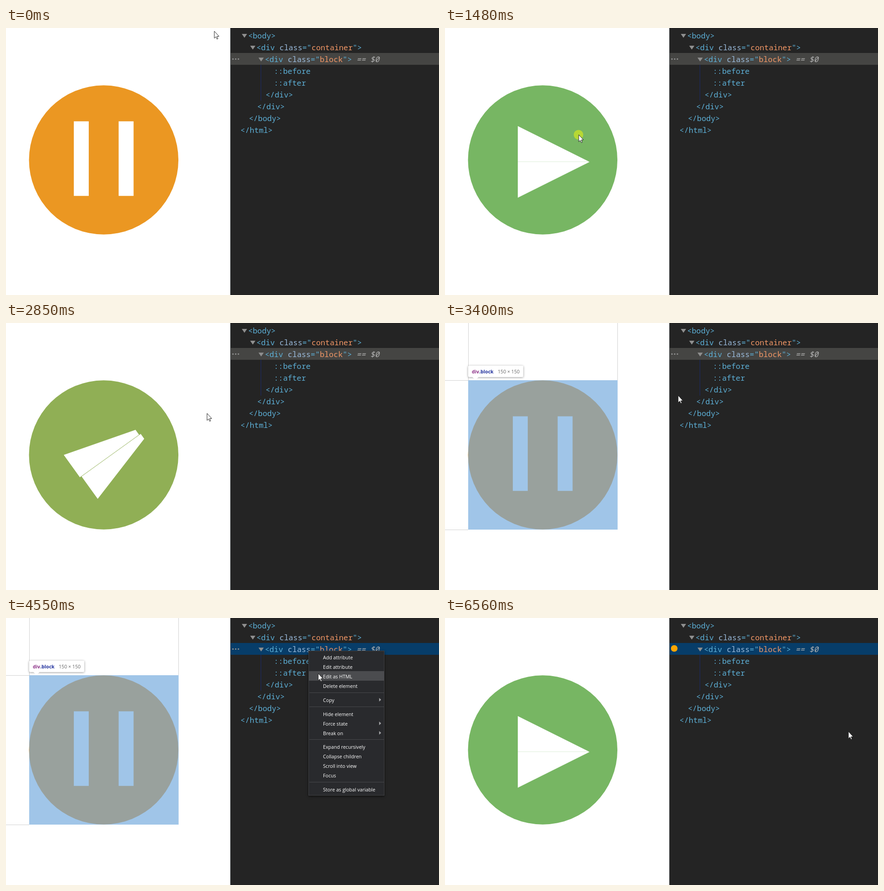
These frames come from a looping animation (952x588 px, 7800 ms). An HTML page with a canvas:

```html
<!DOCTYPE html>
<html lang="en">
<head>
<meta charset="utf-8">
<title>Morphing button in the inspector</title>
<style>
html, body { margin: 0; width: 100%; height: 100%; overflow: hidden; background: #fff; }
canvas { display: block; }
</style>
</head>
<body>
<canvas id="stage" width="952" height="588"></canvas>
<script>
const ctx = document.getElementById('stage').getContext('2d');
const LOOP = 7800, STEP = 77.25;
const ZOOM = 2.19; // page zoom: stage pixels per CSS pixel
const MONO = '500 16.8px "Noto Sans Mono", monospace';
const UI = '10.65px "Open Sans", sans-serif';
const TAG = '#5db0d7', ATTR = '#9bbbdc', VALUE = '#f29766';

// Moments of the story
const ENTER = 870, PRESS = 1460, RELEASE = 2090, LEAVE = 2787, PICK = 4000,
  MENU = 4080, SUBMENU = 5320, CHOOSE = 6170, FORCED = 6320;

// Pointer moves: start, end, x, y
const moves = [
  [330, 1150, 294, 235], [2693, 2850, 442, 199], [3164, 3770, 663, 76],
  [4250, 5090, 743, 233], [5270, 5550, 810, 233], [5560, 6020, 887, 250]
];

// A button state: two halves around (x, y), sizes in CSS pixels.
const state = (color, x, y, deg, dx, dy, long, wide, narrow) => ({
  color,
  halves: [-1, 1].map(side => [x + side * dx * ZOOM, y + side * dy * ZOOM, deg,
    long * ZOOM, wide * ZOOM, narrow * ZOOM])
});
const pause = state([235, 151, 34], 214.8, 287.6, -90, 22.5, 0, 75, 15, 15);
const play = state([119, 182, 99], 238.9, 294.9, 0, 0, 18.04, 72, 36, 0);
const stop = state([253, 37, 38], 212, 291, 180, 0, 0, 60, 60, 60);
stop.halves[1].fill(0, 3); // only one half makes the square

const morphs = [[ENTER, play], [PRESS + 50, stop], [RELEASE, play], [LEAVE, pause], [FORCED - 10, play]];

const tree = [[1, 'body'], [2, 'div', 'container'], [3, 'div', 'block'], [4, '::before'], [4, '::after'],
  [3, '/div'], [2, '/div'], [1, '/body'], [0, '/html']];

const actions = [
  ['Add attribute', 'Edit attribute', 'Edit as HTML', 'Delete element'],
  ['Copy'],
  ['Hide element', 'Force state', 'Break on'],
  ['Expand recursively', 'Collapse children', 'Scroll into view', 'Focus'],
  ['Store as global variable']
];
const nested = ['Copy', 'Force state', 'Break on'];
const states = [[':active', ':hover', ':focus', ':visited', ':focus-within']];

const clamp = x => Math.max(0, Math.min(1, x));
const smooth = x => x * x * (3 - 2 * x);
const mix = (a, b, k) => a.map((v, i) => v + (b[i] - v) * k);
const within = (t, a, b) => t >= a && t < b;

function rect(x, y, w, h, fill) {
  ctx.fillStyle = fill;
  ctx.fillRect(x, y, w, h);
}

function disc(x, y, r, fill) {
  ctx.fillStyle = fill;
  ctx.beginPath();
  ctx.arc(x, y, r, 0, 7);
  ctx.fill();
}

function poly(points, fill) {
  ctx.fillStyle = fill;
  ctx.beginPath();
  points.forEach(p => ctx.lineTo(...p));
  ctx.closePath();
  ctx.fill();
}

// Draws coloured runs of text one after another and returns the end.
function write(x, y, font, ...runs) {
  ctx.font = font;
  for (const [text, fill] of runs) {
    ctx.fillStyle = fill;
    ctx.fillText(text, x, y);
    x += ctx.measureText(text).width;
  }
  return x;
}

function shadow(blur, color, dy = 0) {
  ctx.shadowBlur = blur;
  ctx.shadowColor = color;
  ctx.shadowOffsetY = dy;
}

const refreshTime = t => 380 + STEP * Math.floor((t - 380) / STEP + .15);

const pointerAt = t => moves.reduce(
  (at, [start, end, ...to]) => mix(at, to, smooth(clamp((t - start) / (end - start)))), [458, 7]);

function drawHalf([x, y, deg, long, wide, narrow], side) {
  const l = long / 2, inner = -side * wide / 2;
  ctx.save();
  ctx.translate(x, y);
  ctx.rotate(deg * Math.PI / 180);
  poly([[-l, inner], [l, inner], [l, inner + side * narrow], [-l, -inner]], '#fff');
  ctx.restore();
}

function drawButton(t) {
  let from = pause, to = pause, x = 1;
  for (const [start, next] of morphs) {
    if (t < start) break;
    from = to;
    to = next;
    x = clamp((t - start) / (next === stop ? 310 : 218));
  }
  const k = 1 - (1 - x) ** 1.432;
  disc(214.8, 290.5, 75 * ZOOM, `rgb(${mix(from.color, to.color, smooth(x)).map(Math.round)})`);
  [-1, 1].forEach((side, i) => drawHalf(mix(from.halves[i], to.halves[i], k), side));
}

function drawOverlay() {
  const left = 51, top = 126, size = 150 * ZOOM, guide = '#d0d0d0';
  rect(left, top, size, size + .5, 'rgba(111,168,220,.66)');
  for (const d of [0, 328]) {
    rect(left + d, 0, 1, top, guide);
    rect(0, top + d + (d && 1), left, 1, guide);
  }
  shadow(5, 'rgba(0,0,0,.4)', 1);
  ctx.fillStyle = '#fff';
  ctx.beginPath();
  ctx.roundRect(left, 94, 121, 25, 2);
  ctx.fill();
  shadow(0, 'transparent');
  poly([[60, 118.5], [74, 118.5], [67, 126]], '#fff');
  write(59, 111, 'bold ' + UI, ['div', '#8b2f86'], ['.block', '#1f2f9c']);
  write(116, 111, UI, ['150 × 150', '#666']);
}

function drawTree(t) {
  rect(493, 0, 459, 588, '#242424');
  rect(493, 0, 1, 588, '#494c50');
  rect(494, 55, 458, 26, t >= PICK ? '#073d69' : '#454543');
  if (t >= FORCED) disc(504, 67, 7.3, '#ffa500');
  else [499, 505, 511].forEach(x => disc(x, 68.3, 1.6, '#919191'));
  rect(560, 81, 1, 79, '#1c2a68');

  tree.forEach(([depth, name, cls], i) => {
    const opens = /^\w/.test(name), pseudo = name[0] === ':';
    const x = 515.6 + 18.35 * depth - (opens ? 1.5 : 0), y = 22.7 + 26.07 * i;
    if (opens) poly([[x - 14, y - 9.7], [x - 2.4, y - 9.7], [x - 8.2, y - 1.2]], '#8f8f8f');
    const runs = cls
      ? [[`<${name} `, TAG], ['class', ATTR], ['="', TAG], [cls, VALUE], ['">', TAG]]
      : [[pseudo ? name : `<${name}>`, TAG]];
    const end = write(x, y, MONO, ...runs);
    if (cls === 'block') write(end + 10, y, 'italic ' + MONO, ['== $0', '#b4b4b4']);
  });
}

function drawMenu(x, y, w, groups, active) {
  const gap = 9.75, pitch = 21;
  const h = 28 + gap * (groups.length - 1) + pitch * (groups.flat().length - 1);
  shadow(5, 'rgba(0,0,0,.6)', 2);
  rect(x, y, w, Math.round(h), '#414245');
  shadow(0, 'transparent');
  rect(x + 1, y + 1, w - 2, Math.round(h) - 2, '#292a2d');
  let at = y + 14.2;
  groups.forEach((labels, i) => {
    if (i) rect(x + 2, Math.round(at) - 16, w - 3, 1, '#48494c');
    for (const label of labels) {
      const cy = Math.round(at);
      if (active(cy, label)) rect(x + 1, cy - 11, w - 2, pitch, '#4b4c4f');
      write(x + 32, cy + 4.5, UI, [label, '#fff']);
      if (nested.includes(label)) poly([[820.5, cy - 4], [820.5, cy + 4], [824.7, cy]], '#a8a9ab');
      at += pitch;
    }
    at += gap;
  });
}

function drawPointer(x, y) {
  ctx.save();
  ctx.translate(x, y);
  poly([[0, 0], [0, 15.5], [3.4, 12.4], [5.8, 17.5], [8, 16.5], [5.7, 11.6], [10.3, 11.3]], '#fff');
  ctx.strokeStyle = '#222';
  ctx.stroke();
  ctx.restore();
}

function draw(t) {
  const [x, y] = pointerAt(t);
  const over = cy => Math.abs(y + .5 - cy) <= 10.5;
  const inStates = x > 829;
  const pressed = within(t, PRESS, RELEASE) || within(t, PICK, MENU) || within(t, CHOOSE, FORCED);
  rect(0, 0, 952, 588, '#fff');
  drawButton(t);
  if (x > 493 && y < 160 || within(t, PICK, FORCED)) drawOverlay();
  drawTree(t);
  if (within(t, MENU, FORCED)) {
    drawMenu(665, 72, 167, actions,
      (cy, label) => inStates ? label === 'Force state' : x > 665 && over(cy));
    if (t >= SUBMENU) drawMenu(829, 218, 117, states, cy => inStates && over(cy));
  }
  if (pressed) disc(x - .5, y, 10.5, 'rgba(255,255,0,.47)');
  drawPointer(x, y);
}

const began = performance.now();
function frame() {
  draw(refreshTime((performance.now() - began) % LOOP));
  requestAnimationFrame(frame);
}
frame();
</script>
</body>
</html>
```
